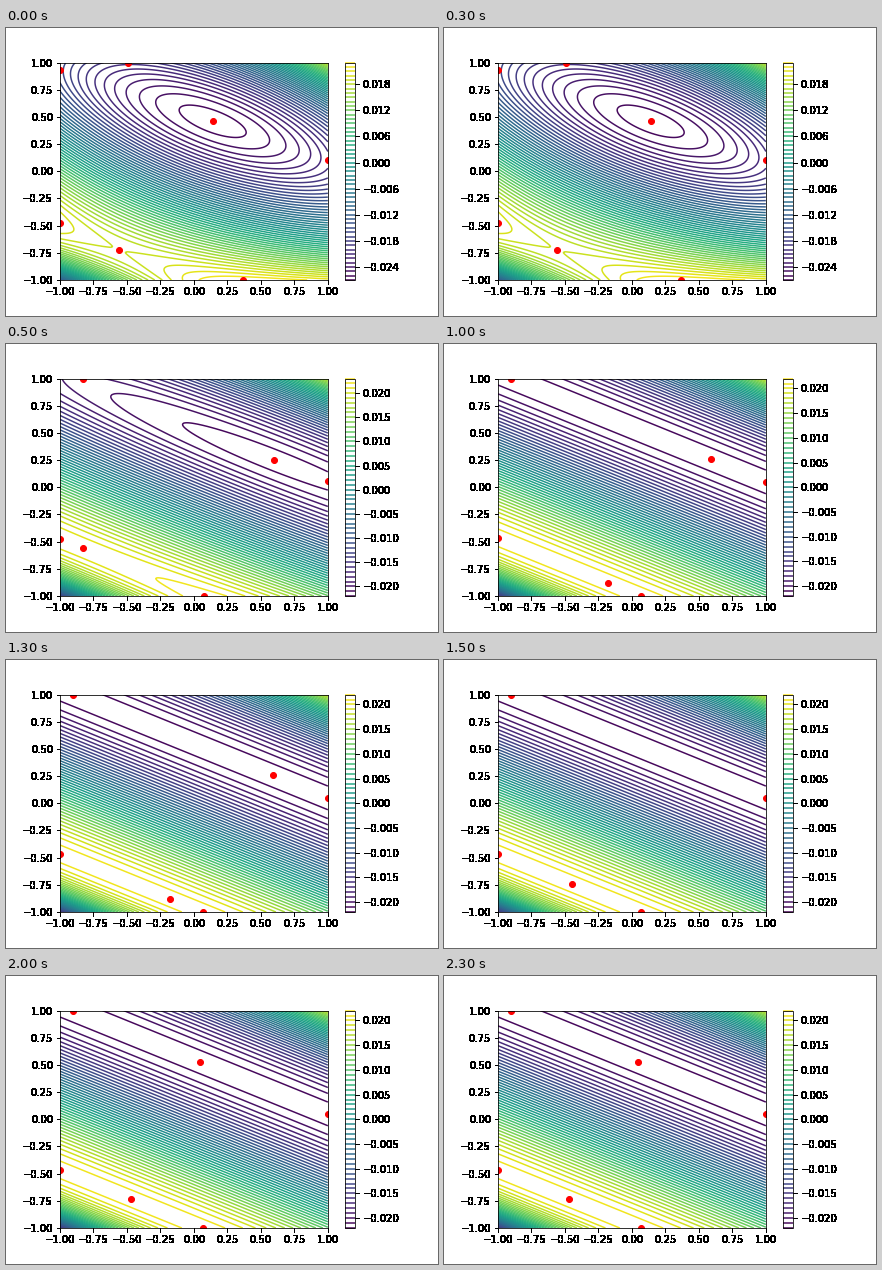
Animation of 432x288 px, one loop 2.5 s. Source, as a matplotlib script:

```python
from collections import namedtuple
import numpy as np
import matplotlib.pyplot as plt
from matplotlib.animation import FuncAnimation

# The surface is a wave across t = x + 2y plus a weak bowl along s = 2x - y.
# A stationary point has its place (t, s) and its height z.
Point = namedtuple("Point", "t s z")
Stage = namedtuple("Stage", "valley crest bowl")


def flat_stage(valley_s, crest_s):
    """Stage without a bowl: dots may lie anywhere along the ridges."""
    return Stage(Point(1.1, valley_s, -0.0215),
                 Point(-1.935, crest_s, 0.0215), 0)


OUTSIDE = 4  # s beyond the visible square

STAGES = [
    Stage(Point(1.06, -0.18, -0.02653), Point(-2, -0.4, 0.01898), 0.00141),
    Stage(Point(1.1, 0.95, -0.02146), Point(-1.95, -1.1, 0.0217), 0.00016),
    flat_stage(0.92, 0.515),
    flat_stage(OUTSIDE, -0.145),
    flat_stage(-0.43, -0.205),
]


def wave(u):
    """Profile with its crest (+1) at u = -1 and its valley (-1) at u = 1."""
    bend = np.polyval([0.01035, -0.0297, 0.01245, -0.0853], u)
    return (u**3 - 3 * u) / 2 + bend * (u**2 - 1)**2


def surface(stage, x, y):
    valley, crest, bowl = stage
    t, s = x + 2 * y, 2 * x - y
    u = (2 * t - valley.t - crest.t) / (valley.t - crest.t)
    axis = (valley.s + crest.s + u * (valley.s - crest.s)) / 2
    middle, height = (crest.z + valley.z) / 2, (crest.z - valley.z) / 2
    return middle + height * wave(u) + bowl * (s - axis)**2


def stationary_points(stage):
    """Points inside the square, then the turning points on its edges."""
    dots = [((p.t + 2 * p.s) / 5, (2 * p.t - p.s) / 5)
            for p in (stage.valley, stage.crest)]
    run = np.linspace(-1, 1, 2001)
    for side in (-np.ones_like(run), np.ones_like(run)):
        for x, y in ((side, run), (run, side)):
            slope = np.diff(surface(stage, x, y))
            turns = np.flatnonzero(slope[:-1] * slope[1:] < 0) + 1
            dots += zip(x[turns], y[turns])
    return dots


def harden(img, dpi):
    """Make every touched pixel opaque, so text has no soft edges."""
    out = img.copy()
    out[..., 3] = img[..., 3] > 0
    return out, 0, 0


X, Y = np.meshgrid(np.linspace(-1, 1, 201), np.linspace(-1, 1, 201))
fig = plt.figure(figsize=(6, 4), dpi=72, facecolor="white")
fig.subplots_adjust(left=0.125, right=0.9, bottom=0.125, top=0.88)


def draw(i):
    stage = STAGES[i]
    fig.clear()
    ax = fig.add_subplot()
    z = surface(stage, X, Y)
    levels = np.arange(np.floor(z.min() * 1000), np.ceil(z.max() * 1000) + 1)
    ticks = levels[levels % np.ceil(len(levels) / 10) == 0]

    lines = ax.contour(X, Y, z, levels / 1000)
    ax.plot(*zip(*stationary_points(stage)), "ro")
    marks = np.linspace(-1, 1, 9)
    ax.set(xlim=(-1, 1), ylim=(-1, 1), xticks=marks, yticks=marks)
    bar = fig.colorbar(lines, ax=ax, ticks=ticks / 1000)
    for axis in (ax.xaxis, ax.yaxis, bar.ax.yaxis):
        axis.set_agg_filter(harden)
    return []


anim = FuncAnimation(fig, draw, frames=len(STAGES), interval=500,
                     init_func=lambda: [], repeat=True, repeat_delay=0)
plt.show()
```
